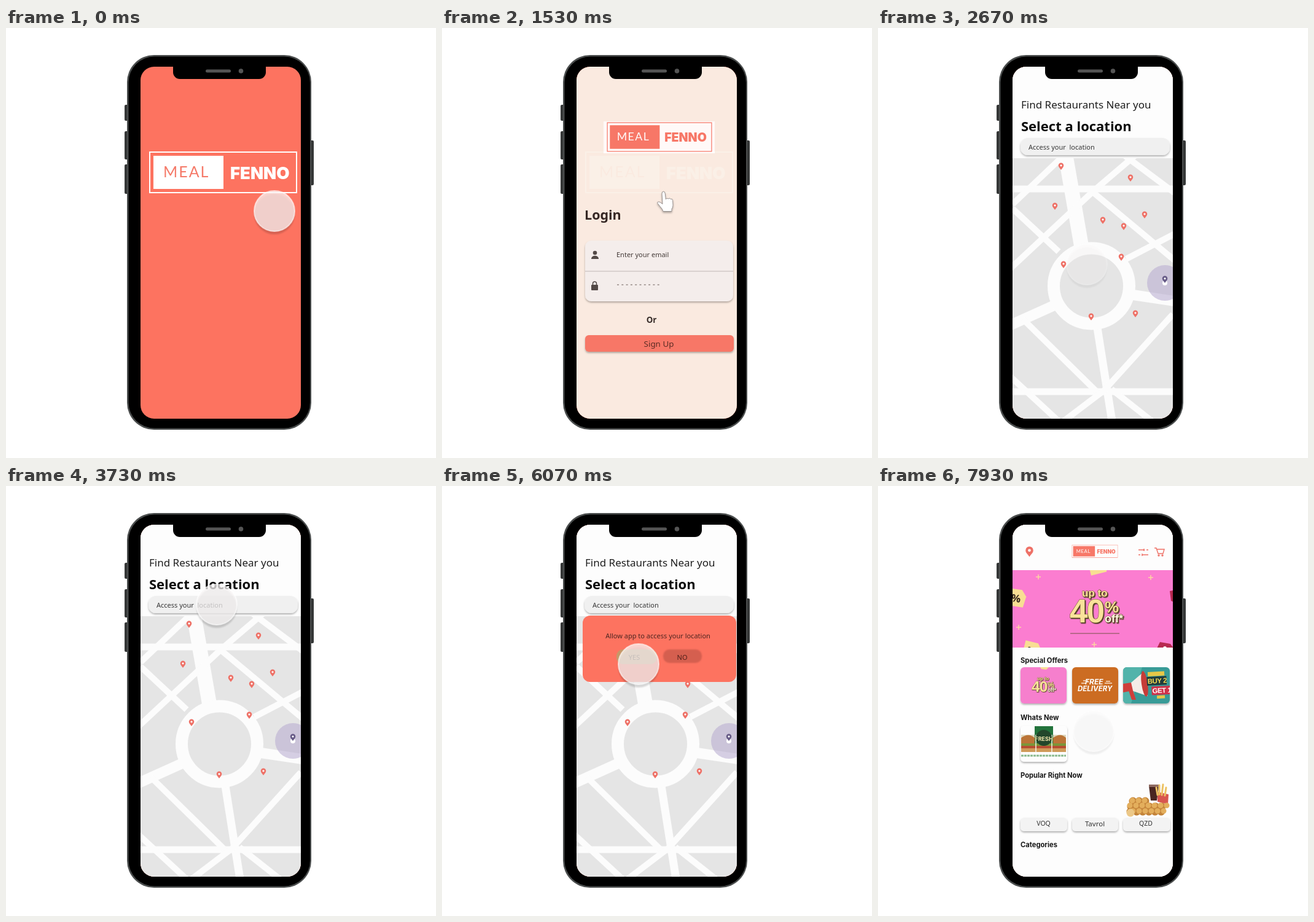
Recreate the animation shown at these times as an HTML page. Size 700x700 px, loop 8000 ms.

```html
<!DOCTYPE html>
<html lang="en">
<head>
<meta charset="utf-8">
<title>Food app walkthrough</title>
<style>
  html, body { margin: 0; width: 100%; height: 100%; overflow: hidden; background: #fff; }
  svg { display: block; width: 100%; height: 100%; font-family: "Noto Sans", "Open Sans", sans-serif; font-size: 11px; }
  .inter { font-family: Inter, Roboto, sans-serif; font-weight: 700; }
  .poster { font-family: "Liberation Sans", sans-serif; font-weight: 700; }
  .mid { text-anchor: middle; }
  .bold { font-weight: 700; }
  .coral { color: #f77868; --ink: #fff; }
  .white { color: #fff; --ink: #f57a69; }
  .road { fill: none; stroke: #fcfcfc; }
  #login, #map, #popup, #home, #hand { opacity: 0; }
</style>
</head>
<body>
<svg viewBox="0 0 700 700">
  <defs>
    <clipPath id="screen"><rect x="219" y="63" width="261" height="573" rx="22"/></clipPath>
    <clipPath id="streets"><rect x="219" y="212" width="261" height="424"/></clipPath>
    <clipPath id="banner"><rect x="219" y="137" width="261" height="126"/></clipPath>
    <clipPath id="offer"><rect x="399" y="295" width="76" height="59" rx="6"/></clipPath>
    <filter id="lift" x="-20%" y="-20%" width="140%" height="160%">
      <feDropShadow dx="0" dy="2" stdDeviation="1.5" flood-opacity=".3"/>
    </filter>
    <filter id="blur"><feGaussianBlur stdDeviation="1.3"/></filter>
    <symbol id="plate" viewBox="-1 -1 241 68">
      <rect width="239" height="66" fill="none" stroke="currentColor" stroke-width="2"/>
      <rect x="6" y="6" width="114" height="54" fill="currentColor"/>
      <text x="22" y="41" font-family="Lato, sans-serif" font-size="25" letter-spacing="2" fill="var(--ink)">MEAL</text>
      <text x="131" y="44" class="inter" font-size="27.500" style="font-weight:900" fill="currentColor">FENNO</text>
    </symbol>
    <g id="pin">
      <path d="M0 6C-2 3-4.3 1.5-4.3-1.2a4.3 4.3 0 0 1 8.6 0C4.3 1.5 2 3 0 6Z"/>
      <circle cy="-1.2" r="1.6" fill="#fff"/>
    </g>
    <filter id="relief" x="-10%" y="-10%" width="125%" height="125%">
      <feDropShadow dx="1.5" dy="1.5" stdDeviation=".3" flood-color="#4b3a22"/>
    </filter>
    <g id="deal" class="poster" fill="#f9e29a" stroke="#6b5428" stroke-width="1" paint-order="stroke" filter="url(#relief)">
      <text x="18" y="0" font-size="17">up to</text>
      <text x="-2" y="42" font-size="53" letter-spacing="-2">40</text>
      <text x="55" y="26" font-size="26">%</text>
      <text x="55" y="42" font-size="18" fill="#fff8e4">off*</text>
    </g>
    <g id="tag">
      <path d="M-13-13 8-13 16-3 13 15-13 15Z" fill="#f8de93"/>
      <text class="mid bold" y="8" font-size="17" fill="#33261c">%</text>
    </g>
    <path id="spark" d="M-4 0H4M0-4V4" stroke="#fbd7a0" stroke-width="1.5"/>
  </defs>

  <g fill="#353737">
    <rect x="193" y="125" width="8" height="26" rx="2"/>
    <rect x="193" y="168" width="8" height="46" rx="2"/>
    <rect x="193" y="222" width="8" height="48" rx="2"/>
    <rect x="493" y="183" width="8" height="73" rx="2"/>
    <rect x="197" y="44" width="300" height="610" rx="44" fill="#4a4d4d"/>
    <rect x="199.500" y="46.500" width="295.500" height="605" rx="42" fill="#000"/>
  </g>

  <g clip-path="url(#screen)">
    <g id="splash">
      <rect x="219" y="63" width="261" height="573" fill="#fd7360"/>
      <use href="#plate" x="233" y="201" width="241" height="68" class="white"/>
    </g>

    <g id="login">
      <rect x="219" y="63" width="261" height="573" fill="#faf0e6"/>
      <rect x="263" y="152" width="181" height="52" fill="#fff"/>
      <use href="#plate" x="268.300" y="153.300" width="171.400" height="48.400" class="coral"/>
      <text x="232" y="312" font-size="21.500" class="bold" fill="#2c2422">Login</text>
      <rect x="233" y="346" width="241" height="99" rx="10" fill="#f4f3f2" filter="url(#lift)"/>
      <path d="M233 396H474" stroke="#cfcccb" stroke-width="1.500"/>
      <g fill="#4c4846">
        <circle cx="249" cy="366" r="3.300"/>
        <path d="M243 376c0-7 12-7 12 0Z"/>
        <rect x="243" y="418" width="11" height="9" rx="1"/>
        <path d="M245.500 418v-2a3 3 0 0 1 6 0v2" fill="none" stroke="#4c4846" stroke-width="1.500"/>
      </g>
      <text x="284" y="373" fill="#3d3937">Enter your email</text>
      <path d="M285 418H355" stroke="#aaa5a2" stroke-width="2" stroke-dasharray="3 4.300"/>
      <text x="341" y="480" font-size="13.300" font-weight="600" class="mid" fill="#302a28">Or</text>
      <rect x="233" y="500" width="242" height="27" rx="6" fill="#f77868" filter="url(#lift)"/>
      <text x="353" y="519" font-size="13.400" class="mid" fill="#552922">Sign Up</text>
    </g>

    <g id="map">
      <rect x="219" y="63" width="261" height="573" fill="#fdfdfd"/>
      <text x="233" y="131" font-size="17" font-weight="500" fill="#1d1d1d">Find Restaurants Near you</text>
      <text x="233" y="168" font-size="22" class="bold" fill="#0b0b0b">Select a location</text>
      <g clip-path="url(#streets)">
        <rect x="219" y="212" width="261" height="424" fill="#e5e5e5"/>
        <g class="road">
          <path stroke-width="11" d="M219 262H480M219 592H480"/>
          <path stroke-width="24" d="M305 205 332 360"/>
          <path stroke-width="13" d="M356 482 381 640"/>
          <path stroke-width="17" d="M288 451 215 484M412 434 485 445"/>
          <path stroke-width="10" d="M219 287 305 205M219 294 294 364M215 392 350 266 418 208M346 264 485 380M404 376 485 334M402 208 485 270M236 474 356 592M480 466 368 590 302 640M380 588 446 640M215 567 294 640"/>
          <circle cx="347.500" cy="420" r="61.500" stroke-width="20"/>
        </g>
        <circle cx="467" cy="415" r="29" fill="#b7a9d0" opacity=".55"/>
        <circle cx="467" cy="415" r="4" fill="#fff"/>
        <use href="#pin" x="467" y="409" fill="#665a86"/>
        <g id="pins" fill="#ee7167"></g>
      </g>
      <rect x="232" y="179" width="243" height="28" rx="12" fill="#f0f0f0" filter="url(#lift)"/>
      <text x="245" y="198" fill="#373737" xml:space="preserve">Access your  location</text>
    </g>

    <g id="popup">
      <rect x="229" y="211" width="250" height="108" rx="12" fill="#fd7360"/>
      <text x="351.500" y="248" class="mid" fill="#4d2520">Allow app to access your location</text>
      <rect x="284" y="266" width="66" height="24" rx="11" fill="#c69869"/>
      <rect x="360" y="266" width="63" height="22" rx="10" fill="#d55f50" filter="url(#blur)"/>
      <text x="313" y="283" class="mid" fill="#40291a">YES</text>
      <text x="391" y="283" class="mid" fill="#51211b">NO</text>
    </g>

    <g id="home">
      <rect x="219" y="63" width="261" height="573" fill="#fdfdfd"/>
      <use href="#pin" transform="translate(246.500 106.500) scale(1.450)" fill="#ee7167"/>
      <use href="#plate" x="315.500" y="95.500" width="75" height="21.500" class="coral"/>
      <g fill="none" stroke="#ee7167" stroke-width="1.400">
        <path d="M424 104H434M437 104H440M424 112H427M430 112H440M433 102V106M430 110V114"/>
        <path d="M450 101H453L456 110H464L466 103H454"/>
        <circle cx="457" cy="113" r="1"/><circle cx="463" cy="113" r="1"/>
      </g>
      <g clip-path="url(#banner)">
        <rect x="219" y="137" width="261" height="126" fill="#fb7dd0"/>
        <use href="#tag" transform="translate(225 181) rotate(8)"/>
        <use href="#tag" transform="translate(356 128) rotate(-14)"/>
        <use href="#tag" transform="translate(250 267) rotate(14)"/>
        <path d="M459 254 476 257 484 268 452 268ZM475 171 484 169V190L477 187Z" fill="#b72950"/>
        <circle cx="467" cy="264" r="3" fill="#fff"/>
        <use href="#spark" x="261" y="148"/><use href="#spark" x="444" y="149"/>
        <use href="#spark" x="229" y="230"/><use href="#spark" x="352" y="258"/>
        <use href="#deal" x="314" y="180"/>
        <path d="M313 240H393" stroke="#b8688b" stroke-width="2"/>
      </g>
      <g class="inter" fill="#171717" font-size="11.200">
        <text x="232" y="288">Special Offers</text>
        <text x="232" y="381">Whats New</text>
        <text x="232" y="475">Popular Right Now</text>
        <text x="232" y="588">Categories</text>
      </g>
      <g filter="url(#lift)">
        <rect x="232" y="295" width="75" height="59" rx="6" fill="#f67fcd"/>
        <rect x="316" y="295" width="75" height="59" rx="6" fill="#cc6c21"/>
        <rect x="399" y="295" width="76" height="59" rx="6" fill="#399b97"/>
        <rect x="232" y="390" width="76" height="59" rx="6" fill="#fdfdfd"/>
      </g>
      <use href="#deal" transform="translate(251 316) scale(.460)"/>
      <path d="M264 295 278 295 274 299 266 298Z" fill="#f8de93"/>
      <g class="inter" font-style="italic" fill="#fff">
        <text x="337" y="323" font-size="12">FREE</text>
        <text x="325" y="334" font-size="11.500">DELIVERY</text>
        <path d="M334 317H342M331 321H338M369 321H381M371 318H378" stroke="#f7dfcb" stroke-width="1.500"/>
      </g>
      <g clip-path="url(#offer)">
        <path d="M399 295H430L412 354H399Z" fill="#52b3aa"/>
        <path d="M411 321 433 302 439 342 413 333Z" fill="#f4ece7"/>
        <path d="M399 322 412 320 415 333 399 336ZM408 333H415L420 348H413Z" fill="#ce3f3b"/>
        <ellipse cx="434" cy="322" rx="5" ry="21" transform="rotate(-8 434 322)" fill="#c53c38"/>
        <g class="poster" font-size="11.500" letter-spacing="-.500" transform="rotate(-3 457 323)">
          <rect x="440" y="302" width="27" height="7" fill="#e6c747"/>
          <rect x="438" y="310" width="32" height="14" fill="#203b3c"/>
          <text x="439" y="321" fill="#f4d950">BUY 2</text>
          <rect x="445" y="326" width="34" height="14" fill="#cf3249"/>
          <text x="446" y="337" fill="#fff">GET 1</text>
          <rect x="453" y="341" width="13" height="5" fill="#e6c747"/>
        </g>
      </g>
      <g>
        <rect x="233" y="405" width="73" height="28" fill="#ded7bd"/>
        <path d="M255 391H285V424H255Z" fill="#23733c"/>
        <path d="M233 410q12-9 22 0v10H233ZM285 410q12-9 21 0v10H285Z" fill="#bb7437"/>
        <path d="M233 421H306" stroke="#7a9639" stroke-width="4"/>
        <path d="M233 425H306" stroke="#b74d32" stroke-width="4"/>
        <path d="M233 430H306" stroke="#cf9b59" stroke-width="6"/>
        <path d="M257 405V433M283 405V433" stroke="#f8f4ea" stroke-width="1.500"/>
        <circle cx="270" cy="410" r="13" fill="#23462b"/>
        <text x="270" y="415" class="inter mid" font-size="9" fill="#f4e7ad">FRESH</text>
        <path d="M233 439H306" stroke="#8aba8e" stroke-width="3" stroke-dasharray="4 1"/>
      </g>
      <g fill="none" stroke-linecap="round">
        <path d="M441 488H457L454 512H444Z" fill="#4a2521"/>
        <path d="M441 486H457V490H441Z" fill="#8f6b62"/>
        <path d="M455 498 473 502 472 518 455 514Z" fill="#d8564f"/>
        <path d="M453 491 455 503M458 487V502M464 486 462 503M469 491 467 504" stroke="#ecc263" stroke-width="3"/>
        <path d="M415 513H436M412 522H472M411 530H470" stroke="#c4843a" stroke-width="13" stroke-dasharray="0 10"/>
        <path d="M414 512H437M410 520H472M415 529H468" stroke="#e3ae5c" stroke-width="9" stroke-dasharray="0 10"/>
        <circle cx="411" cy="532" r="6.500" fill="#ecc888"/>
      </g>
      <g fill="#f3f3f3" filter="url(#lift)">
        <rect x="232" y="540" width="76" height="22" rx="6"/>
        <rect x="316" y="540" width="75" height="22" rx="6"/>
        <rect x="399" y="540" width="77" height="22" rx="6"/>
      </g>
      <g class="mid" fill="#333" font-size="10.500">
        <text x="269.500" y="553">VOQ</text>
        <text x="353" y="554" font-size="11.500">Tavrol</text>
        <text x="436" y="553">QZD</text>
      </g>
    </g>

    <g id="touch">
      <circle cy="5" r="33" fill="#000" opacity=".150" filter="url(#blur)"/>
      <circle r="33" fill="#f8f6f6" fill-opacity=".740" stroke="#fff" stroke-opacity=".600" stroke-width="2"/>
    </g>
    <path id="hand" filter="url(#lift)" fill="#fff" stroke="#8d8583" stroke-width=".900" stroke-linejoin="round"
      d="M358 270q0-4 2.500-4t2.800 4l1 9q1.500-3 4-1 2-2 4 .5 3-1 3.300 2l.4 8q0 4-2 6v4H360q-1-4-5-8l-4-5q-1-4 4-2l4 3Z"/>
  </g>

  <path d="M272 60H423V72a11 11 0 0 1-11 11H283a11 11 0 0 1-11-11Z"/>
  <rect x="325" y="67.500" width="41" height="5" rx="2.500" fill="#555"/>
  <circle cx="382.500" cy="70" r="3.800" fill="#555"/>
</svg>

<script>
  const LOOP = 8000;
  const byId = id => document.getElementById(id);

  // steps: [time in ms, value]; two steps at one time make a hard change
  function play(id, property, steps) {
    const padded = [[0, steps[0][1]], ...steps, [LOOP, steps.at(-1)[1]]];
    byId(id).animate(
      padded.map(([time, value]) => ({ offset: time / LOOP, [property]: value })),
      { duration: LOOP, iterations: Infinity }
    );
  }

  const fade = (id, ...steps) => play(id, "opacity", steps);
  const move = (id, ...steps) =>
    play(id, "transform", steps.map(([time, x, y]) => [time, `translate(${x}px, ${y}px)`]));

  const places = [[298, 225], [411, 244], [288, 290], [366, 313], [434, 304],
                  [400, 323], [396, 373], [302, 385], [347, 470], [419, 465]];
  byId("pins").innerHTML = places.map(([x, y]) => `<use href="#pin" x="${x}" y="${y}"/>`).join("");

  fade("login", [1330, 0], [1540, 1]);
  fade("map", [2330, 0], [2600, 1]);
  fade("popup", [4530, 0], [4530, 1]);
  fade("home", [6860, 0], [7130, 1]);
  fade("hand", [1320, 0], [1320, 1], [1870, 1], [1870, 0]);

  move("touch",
    [1070, 437, 298], [1270, 372, 300], [1930, 362, 300], [2130, 340, 385],
    [3330, 340, 385], [3330, 400, 600], [3730, 343, 193],
    [5000, 343, 193], [5000, 424, 519], [5330, 432, 437], [5470, 432, 437], [5800, 320, 290],
    [6670, 320, 290], [6670, 384, 535], [6870, 384, 535], [7130, 351, 399]);

  fade("touch",
    [1200, 1], [1310, 0], [1870, 0], [1930, 1], [2600, 1], [2670, .35], [2740, 0],
    [3330, 0], [3400, 1], [4460, 1], [4530, .5], [4670, 0],
    [5000, 0], [5070, 1], [6870, 1], [7130, .4]);
</script>
</body>
</html>
```
